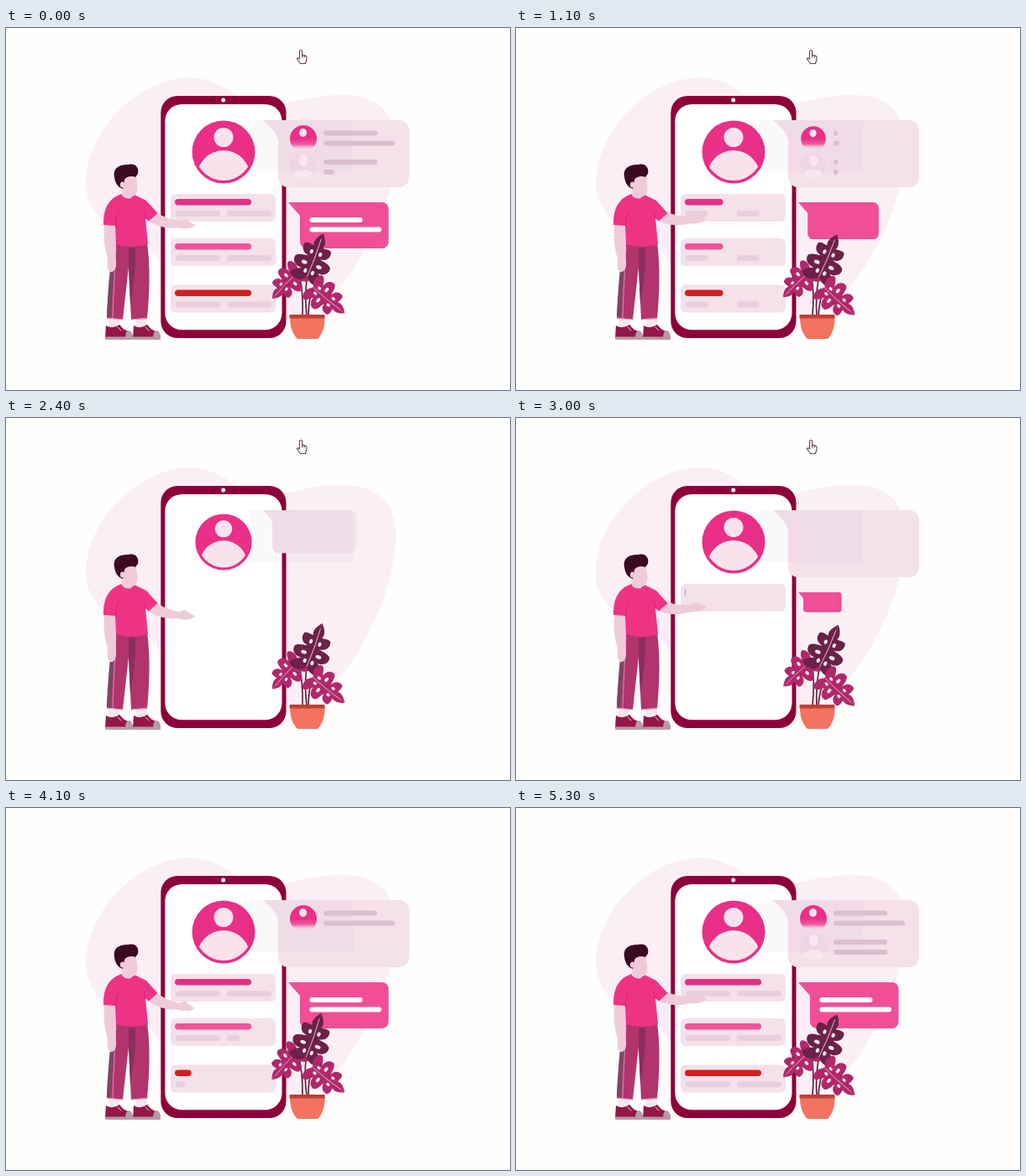
An HTML page with a canvas for the animation above (5400 ms loop, 600 px wide and 432 px high).

```html
<!DOCTYPE html>
<html lang="en">
<head>
<meta charset="utf-8">
<title>Chat illustration</title>
<style>
html, body { margin: 0; overflow: hidden; background: #fefefc; }
canvas { display: block; }
</style>
</head>
<body>
<canvas id="stage" width="600" height="432"></canvas>
<script>
const ctx = document.getElementById('stage').getContext('2d');
const LOOP = 5400, CYCLE = 4950;
const PALE = '#f4e1ea', PINK = '#ea2f86', SKIN = '#efcbda', LINE = '#dabfcd';

let now = 0; // time within the enter-then-leave cycle

const ramp = (from, to) => {
  const p = Math.min(1, Math.max(0, (now - from) / (to - from)));
  return p * p * (3 - 2 * p);
};
// 0 to 1 while entering, back to 0 while leaving
const shown = (a, b, c, d) => ramp(a, b) * (1 - ramp(c, d));

function fill(path, color) {
  ctx.fillStyle = color;
  ctx.fill(new Path2D(path));
}
function stroke(path, color, width) {
  ctx.strokeStyle = color;
  ctx.lineWidth = width;
  ctx.stroke(new Path2D(path));
}
function box(x, y, w, h, r, color) {
  if (w < 0.5) return;
  ctx.fillStyle = color;
  ctx.beginPath();
  ctx.roundRect(x, y, w, h, r);
  ctx.fill();
}
function oval(x, y, rx, ry, color) {
  ctx.fillStyle = color;
  ctx.beginPath();
  ctx.ellipse(x, y, rx, ry, 0, 0, 7);
  ctx.fill();
}
function scaled(x, y, s, draw) {
  if (s < 0.01) return;
  ctx.save();
  ctx.translate(x, y);
  ctx.scale(s, s);
  ctx.translate(-x, -y);
  draw();
  ctx.restore();
}
function turned(x, y, angle, draw) {
  ctx.save();
  ctx.translate(x, y);
  ctx.rotate(angle * Math.PI / 180);
  draw();
  ctx.restore();
}

function backdrop() {
  ctx.fillStyle = '#fefefc';
  ctx.fillRect(0, 0, 600, 432);
  fill('M95 187C95 120 160 60 217 59.5C250 60 263 74 285 88C310 104 345 80 400 80C446 80 466 105 464 147C461 205 430 265 405 300C385 328 360 345 320 350C220 345 195 290 170 262C130 244 97 225 95 187Z', '#f9eff5');
}

function phone() {
  box(184.3, 81, 149.2, 289, 20, '#8e003a');
  box(189.3, 91, 139.2, 269.3, 20, '#fff');
  oval(258.7, 86, 2.5, 2.5, '#fff');
}

function profile() {
  scaled(259, 148, shown(2080, 2480, 6080, 6400), () => {
    oval(259, 148, 37.5, 37.5, PINK);
    oval(259, 130.5, 11.5, 11.5, '#f8e3ed');
    ctx.save();
    ctx.beginPath();
    ctx.arc(259, 148, 34, 0, 7);
    ctx.clip();
    oval(259, 179, 32, 33, '#f8e3ed');
    ctx.restore();
  });
}

function card(y, delay, color) {
  const grow = (a, b) => shown(a + delay, b + delay, 5850, 6250);
  scaled(205, y + 16.5, shown(2470 + delay, 2870 + delay, 6380, 6760), () => box(196, y, 125, 33, 6, PALE));
  const first = grow(2980, 3380);
  box(201, y + 6, 91 * first, 7.5, 4, color);
  box(202, y + 20, 53 * first, 7, 3.5, '#e7d0dc');
  box(263, y + 20, 53 * grow(3460, 3860), 7, 3.5, '#e7d0dc');
}

function bubbles() {
  scaled(305, 110, shown(2162, 2562, 6265, 6665), () => {
    fill('M305 110H336V150L325 137Q321 120 305 110Z', PALE);
    box(324, 110, 156, 80, 12, PALE);
  });
  ctx.fillStyle = 'rgba(90, 50, 75, .028)';
  ctx.fillRect(289, 110, 124, 62);
  scaled(336, 208, shown(2850, 3180, 5950, 6300), () => {
    fill('M336 208H365V235L350 224Z', '#f04f98');
    box(350, 208, 105.5, 55, 8, '#f04f98');
  });

  scaled(354, 132, shown(3050, 3400, 6000, 6300), () => {
    const fade = ctx.createLinearGradient(0, 132, 0, 146);
    fade.addColorStop(0, PINK);
    fade.addColorStop(0.5, '#ec5c9e');
    fade.addColorStop(1, 'rgba(244, 225, 234, 0)');
    oval(354, 132, 16, 16, fade);
    oval(353.5, 125, 4.5, 5, '#f8e3ed');
  });
  scaled(354, 165, shown(4050, 4400, 6000, 6300), () => {
    oval(354, 165, 16, 16, '#eed6e2');
    oval(354, 158, 5.5, 7, '#f7e8ef');
    oval(354, 175, 12, 6, '#f7e8ef');
  });

  [[122.5, 64, 3280, 3600], [134.5, 85, 3650, 3950], [157, 64, 4490, 4790], [169, 64, 4850, 5200]]
    .forEach(([y, w, a, b]) => box(378, y, w * shown(a, b, 5720, 6120), 6, 3, LINE));
  [[226, 63, 3150, 3500], [237.5, 85.5, 3490, 3860]]
    .forEach(([y, w, a, b]) => box(361.5, y, w * shown(a, b, 5400, 5850), 6, 3, '#fff'));
}

const half = 'C-6 8 -16 9 -22 3C-24 -2 -18 -5 -11 -9C-18 -8 -26 -13 -24 -21C-20 -26 -13 -25 -8 -27C-14 -27 -21 -32 -18 -41C-13 -44 -9 -41 -6 -42C-9 -46 -6 -53 0 -60';

function leaf(x, y, angle, size, color) {
  turned(x, y, angle, () => {
    ctx.scale(size, size);
    for (const side of [-1, 1]) {
      ctx.save();
      ctx.scale(side, 1);
      fill('M0 0' + half + 'Z', color);
      oval(-5, -7, 2.2, 3, '#f8e8f0');
      oval(-10, -17, 3.8, 2.4, '#f8e8f0');
      oval(-6, -33, 2.2, 3, '#f8e8f0');
      ctx.restore();
    }
    stroke('M0 0Q2 -25 0 -52', '#e9b9cf', 0.9);
  });
}

function plant(sway) {
  turned(358, 343, 6.5 * (sway - 0.3), () => {
    ctx.translate(-358, -343);
    stroke('M353 343Q354 315 348 291M358 343Q355 320 358 298M360 343Q360 325 365 310', '#5e1838', 1.6);
    leaf(347, 291, -137, 0.74, '#b1286a');
    leaf(358, 297, 20, 0.92, '#6c2146');
    leaf(366, 310, 129, 0.8, '#b1286a');
  });
  fill('M338 345H379.5C380 357 376 366 371 371H347C341 365 338 357 338 345Z', '#f2735f');
  box(337.5, 342, 42, 4.5, 1, '#bd4035');
}

function shoe(x) {
  box(x + 4, 346, 13, 13, 1, '#f8e6ee');
  fill(`M${x + 1} 355Q${x + 9} 360 ${x + 17} 354L${x + 25} 361Q${x + 33} 363 ${x + 33} 370H${x}Z`, '#951649');
  fill(`M${x + 24} 370Q${x + 24} 361 ${x + 29} 361Q${x + 33} 363 ${x + 33} 370Z`, '#b79aa8');
  stroke(`M${x + 15} 357l4 4M${x + 19} 356l4 4`, '#f8e6ee', 0.9);
  box(x, 368.5, 33, 3.5, 1, '#b79aa8');
}

function person(sway) {
  shoe(118);
  shoe(151);
  fill('M129 256C125 290 121 318 120 346L139 348L146 285L149 348L168 347C171 315 172 285 168 256Z', '#b2346d');
  fill('M127 262C123 292 121 318 120 346L124 347L131 262Z', '#7d4566');
  fill('M146 262H154Q155 285 150 318L148 330L146 285Z', '#8a2f5c');
  stroke('M131 262Q128 310 127 346', '#dfa6c1', 0.8);
  stroke('M120 346L139 348M149 348L168 346', '#dc9dbb', 1.2);

  turned(172, 222, 20 * (0.3 - sway), () => {
    ctx.translate(-172, -222);
    fill('M164 226L178 219C186 226 196 229 206 231L214 228.5L217 231.5L225 236.5C222 241 212 241 205 239C190 240 176 237 164 226Z', SKIN);
  });
  fill('M117 234L131 235C132 255 130 268 131 278C132 288 128 292 124 291C119 287 121 280 121 275C117 262 116 250 117 234Z', SKIN);
  fill('M138 198C146 204 150 202 153 199L167 206L180.5 221L170 230.5L166 227L169 258C155 262 140 261 131 258L130 236L116 235C116 215 122 203 138 198Z', '#ee3385');
  stroke('M131 237Q130 227 134 220M166 227L164 219', '#c92370', 0.9);
  fill('M138 181C143 177 150 175 155 178L156.5 191C156 198 153 201 150 201L149 203Q143 205 138 200L138 190Z', SKIN);
  fill('M129 178C127 166 136 163 146 163C153 161 159 166 157 174L154 178C150 176 143 177 141 181L139 192C133 190 130 185 129 178Z', '#3c0a20');
  oval(138.5, 187, 2.6, 3.6, SKIN);
}

function cursor(t) {
  if (t >= 3300) return;
  ctx.save();
  ctx.translate(352, 34 - 20 * Math.max(0, (t - 3100) / 200));
  const hand = 'M-2.5 3V-6.5Q-1 -9 .6 -6.5V-2L5 -.8Q6.5 0 6 3L4.5 8.5H-1.5L-5.5 3Q-5.5 .5 -2.5 3Z';
  fill(hand, '#fff');
  stroke(hand + 'M.6 -2V1M3 -1.4V1', '#5e4050', 1.1);
  ctx.restore();
}

function draw(ms) {
  const t = Math.floor(ms % LOOP / 100) * 100;
  now = t < 1900 ? t + CYCLE : t;
  const sway = 0.5 + 0.5 * Math.cos(2 * Math.PI * (t - 720) / (CYCLE / 2));
  ctx.lineCap = ctx.lineJoin = 'round';
  backdrop();
  phone();
  profile();
  card(198, 0, '#e23086');
  card(251, 500, '#ee5499');
  card(306.5, 1000, '#d31f1b');
  bubbles();
  plant(sway);
  person(sway);
  cursor(t);
}

const start = performance.now();
function tick() {
  draw(performance.now() - start);
  requestAnimationFrame(tick);
}
tick();
</script>
</body>
</html>
```
